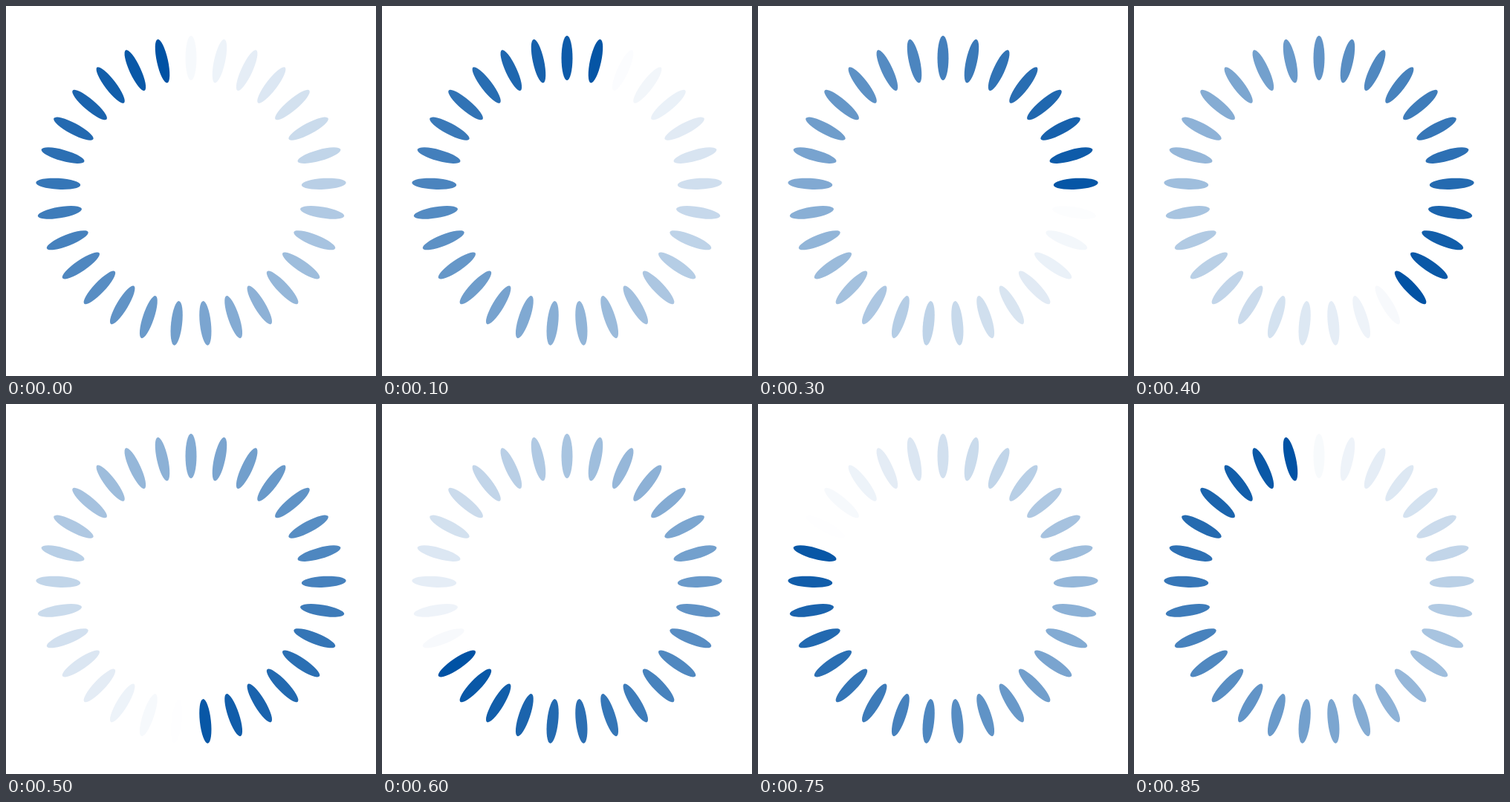
Write an HTML page that moves like this. It is 498 px wide and 498 px high and loops after 900 ms.

```html
<!DOCTYPE html>
<html lang="en">
<head>
<meta charset="utf-8">
<title>Loading ring</title>
<style>
html, body { margin: 0; width: 100%; height: 100%; overflow: hidden; background: #fff; }
svg { display: block; width: 100vw; height: 100vh; }
</style>
</head>
<body>
<svg id="ring" viewBox="0 0 498 498" fill="#0052a4"></svg>
<script>
const COUNT = 29, LOOP = 900, STEP = 50;
// [step, head position]: the dark head speeds up and slows down on its way round
const path = [[0, -1], [4, 4.15], [8, 11.1], [10, 14.92], [12, 19.05], [15, 23.92], [17, 28.1]];
const ring = document.getElementById('ring');

const petals = Array.from({ length: COUNT }, (_, i) => {
  const petal = document.createElementNS('http://www.w3.org/2000/svg', 'ellipse');
  const attrs = { cx: 249, cy: 70, rx: 7.5, ry: 30, transform: `rotate(${i * 360 / COUNT} 249 249)` };
  for (const name in attrs) petal.setAttribute(name, attrs[name]);
  return ring.appendChild(petal);
});

function headAt(step) {
  const n = Math.max(1, path.findIndex(point => point[0] >= step));
  const [s0, h0] = path[n - 1], [s1, h1] = path[n];
  return h0 + (h1 - h0) * (step - s0) / (s1 - s0);
}

function draw(ms) {
  const head = headAt(Math.floor((ms % LOOP) / STEP));
  petals.forEach((petal, i) => {
    const behind = (head - i + 2 * COUNT) % COUNT;
    petal.setAttribute('fill-opacity', (1 - behind / COUNT).toFixed(4));
  });
}

const start = performance.now();
function tick() {
  draw(performance.now() - start);
  requestAnimationFrame(tick);
}
tick();
</script>
</body>
</html>
```
